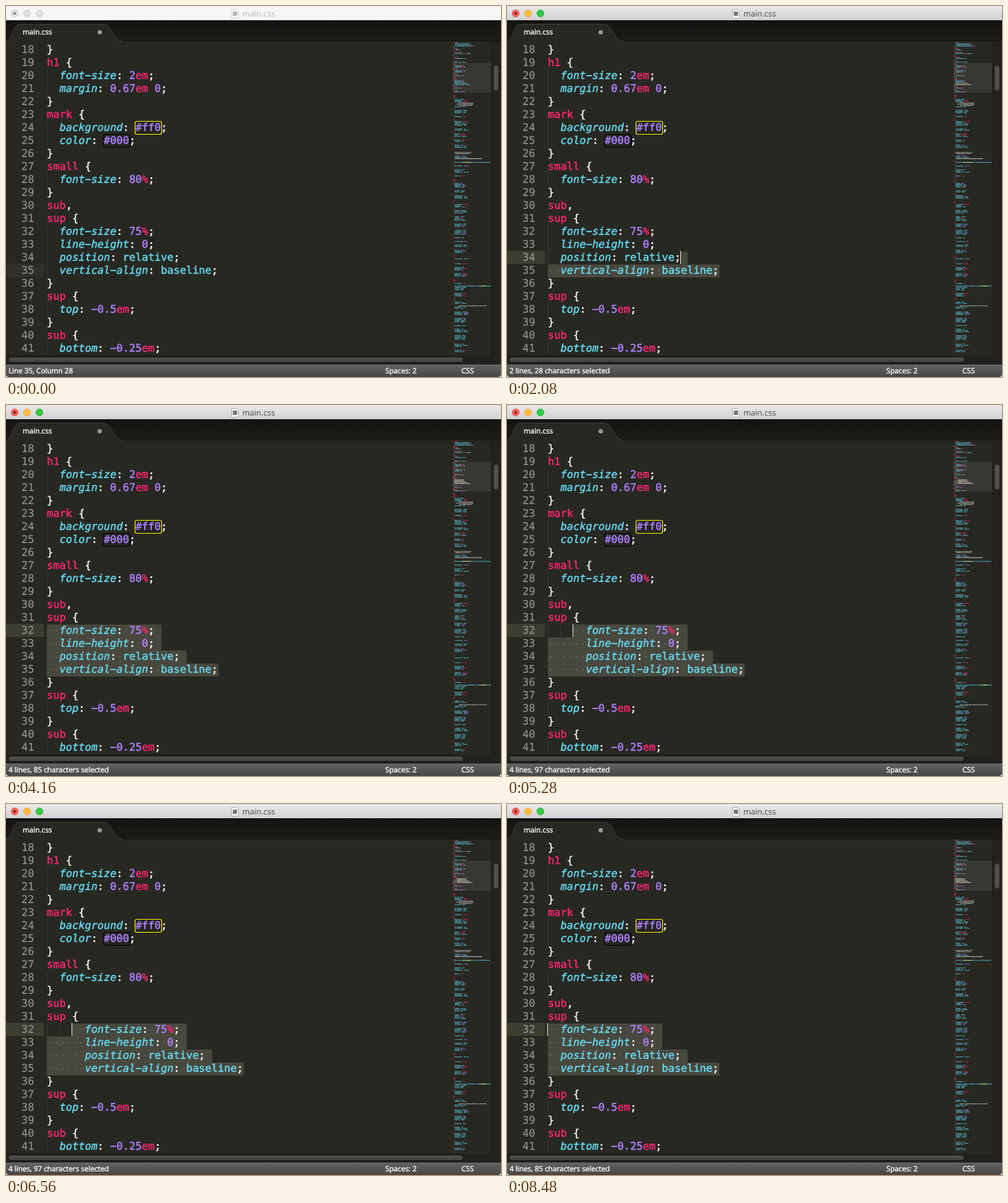
These frames come from a looping animation (800 by 600 pixels, 8.8 s). An HTML page with a canvas:

```html
<!DOCTYPE html>
<html lang="en">
<head>
<meta charset="utf-8">
<title>main.css</title>
<style>
  html, body { margin: 0; width: 100%; height: 100%; overflow: hidden; background: #fff; }
  svg, canvas { position: absolute; left: 0; top: 0; display: block; }
  canvas { left: 722px; top: 58px; }
  text { white-space: pre; text-rendering: geometricPrecision; }
  .ui { font: 11.7px "Open Sans", "Noto Sans", sans-serif; fill: #fff; stroke: #fff; stroke-width: .4; }
  .title { font: 13px "Open Sans", "Noto Sans", sans-serif; fill: #484848; }
  .code { font: 17px "DejaVu Sans Mono", monospace; stroke-width: .5; }
  .line { fill: #8f908a; stroke: #8f908a; stroke-width: .25; text-anchor: end; }
  .prop { font-style: italic; }
  .idle .title { fill: #b6b6b6; }
  .idle .icon { opacity: .5; }
  .idle .bar { fill: #f6f6f6; }
  .idle .light { fill: #dedede; stroke: #c8c8c8; }
  .idle .dirty { fill: #808080; }
</style>
</head>
<body>
<svg id="stage" width="800" height="600" viewBox="0 0 800 600">
  <defs>
    <linearGradient id="chrome" x2="0" y2="1"><stop stop-color="#ebe9eb"/><stop offset="1" stop-color="#d2d0d2"/></linearGradient>
    <linearGradient id="tabs" x2="0" y2="1"><stop stop-color="#131411"/><stop offset="1" stop-color="#1b1c18"/></linearGradient>
    <linearGradient id="status" x2="0" y2="1"><stop stop-color="#626262"/><stop offset="1" stop-color="#464646"/></linearGradient>
    <linearGradient id="thumb" x2="0" y2="1"><stop stop-color="#555651"/><stop offset="1" stop-color="#3e3f3a"/></linearGradient>
  </defs>
  <path fill="#272822" d="M0 0H800V580H0Z"/>
  <rect class="bar" width="800" height="23" fill="url(#chrome)"/>
  <g stroke-width=".8">
    <circle class="light" cx="14" cy="12" r="5.7" fill="#fc605b" stroke="#df4744"/>
    <circle class="light" cx="34" cy="12" r="5.7" fill="#fdbc40" stroke="#de9f34"/>
    <circle class="light" cx="54" cy="12" r="5.7" fill="#34c84a" stroke="#27aa35"/>
  </g>
  <circle class="dirty" cx="14" cy="12" r="2" fill="#730b08"/>
  <g class="icon">
    <path d="M364.5 5.500H372.500L375.500 8.500V19.500H364.500Z" fill="#fff" stroke="#a8a8a8"/>
    <rect x="366.500" y="9" width="7" height="7" fill="#777"/>
  </g>
  <text class="title" x="382" y="17">main.css</text>

  <rect y="23" width="800" height="34" fill="url(#tabs)"/>
  <path d="M0 57.500C12 55 9 29.500 22 29.500H157C173 29.500 170 54 188 57.500" fill="#272822" stroke="#41423c"/>
  <path d="M188 56.500H800" stroke="#11120f"/>
  <text class="ui" x="27" y="46">main.css</text>
  <circle cx="151.500" cy="42.500" r="3.600" fill="#989994"/>

  <g id="code" class="code"></g>

  <path d="M785 57H800V580H785Z" fill="#21221e"/>
  <path d="M784.500 57V566" stroke="#191a17"/>
  <rect x="788.500" y="96.500" width="7" height="40" rx="3.500" fill="#50514c" stroke="#3f403b"/>
  <path d="M0 565H785V580H0Z" fill="#21221e"/>
  <path d="M0 565.500H785" stroke="#191a17"/>
  <rect x="4" y="568" width="735" height="8.500" rx="4.200" fill="url(#thumb)" stroke="#141511"/>
  <path d="M0 580H800V595Q800 600 795 600H5Q0 600 0 595Z" fill="url(#status)"/>
  <path d="M0 580.500H800" stroke="#747474"/>
  <text id="info" class="ui" x="4" y="594"></text>
  <text class="ui" x="613" y="594">Spaces: 2</text>
  <text class="ui" x="736" y="594">CSS</text>
</svg>
<canvas id="map" width="62" height="508"></canvas>
<svg width="800" height="600"><path id="pointer" d="M354.500 432.500V447L357.800 444L360.300 449.800L363 448.600L360.500 443H365Z" fill="#111" stroke="#fff"/></svg>

<script>
const LOOP = 8800, FIRST = 18, LEFT = 66, ADVANCE = 10.234, PITCH = 21, INDENTED = 32, LAST = 35;
const FOCUS = 320, POINTER_END = 1120, CARET_RESET = 960;
const source = `html {
  font-family: sans-serif;
  -ms-text-size-adjust: 100%;
  -webkit-text-size-adjust: 100%;
}
body {
  margin: 0;
}
abbr[title] {
  border-bottom: 1px dotted;
}
b,
strong {
  font-weight: bold;
}
dfn {
  font-style: italic;
}
h1 {
  font-size: 2em;
  margin: 0.67em 0;
}
mark {
  background: #ff0;
  color: #000;
}
small {
  font-size: 80%;
}
sub,
sup {
  font-size: 75%;
  line-height: 0;
  position: relative;
  vertical-align: baseline;
}
sup {
  top: -0.5em;
}
sub {
  bottom: -0.25em;`.split('\n');

// time, caret line, caret column, extra indent levels
const steps = [
  [0, 35, 27, 0], [2080, 34, 21, 0], [2400, 33, 17, 0], [2720, 32, 17, 0],
  [3040, 32, 2, 0], [3200, 32, 0, 0], [4960, 32, 2, 1], [5280, 32, 4, 2],
  [5440, 32, 6, 3], [6560, 32, 4, 2], [6880, 32, 2, 1], [7040, 32, 0, 0]
];
// time since the last key press, caret opacity
const blink = [[0, 1], [640, .75], [800, .35], [960, 0], [1280, .5], [1440, 1]];

const colours = { sel: '#f92672', prop: '#66d9ef', word: '#66d9ef', num: '#ae81ff', unit: '#f92672', punct: '#f8f8f2' };
const byId = id => document.getElementById(id);
const lastAt = (table, t) => table.filter(row => row[0] <= t).pop();
const colX = col => LEFT + col * ADVANCE;
const lineY = n => 60 + (n - FIRST) * PITCH;
const rect = (x, y, w, h, fill, more = '') => `<rect x="${x}" y="${y}" width="${w}" height="${h}" fill="${fill}" ${more}/>`;

function tokenize(text) {
  const declaration = text[0] === ' ';
  return [...text.matchAll(/[a-z-]*[a-z][a-z\d-]*|#\w+|-?\d[\d.]*|[^\s\w]/g)].map(({ 0: word, index: col }) => {
    let kind = 'punct';
    if (/^(em|px|%)$/.test(word)) kind = 'unit';
    else if (/^#|\d$/.test(word) && declaration) kind = 'num';
    else if (/[a-z]/.test(word)) kind = !declaration ? 'sel' : text[col + word.length] === ':' ? 'prop' : 'word';
    return { word, col, kind };
  });
}

function linesFor(indent) {
  return source.map((text, i) => {
    const n = i + 1;
    return { n, text: (n >= INDENTED && n <= LAST ? '  '.repeat(indent) : '') + text };
  });
}

// selected columns of a line, or null
function selection(line, row, col) {
  if (row === LAST || line.n < row || line.n > LAST) return null;
  return { from: line.n === row ? col : 0, to: line.text.length + (line.n < LAST ? 1 : 0) };
}

function drawLine(line, row, col, focused) {
  const { n, text } = line, y = lineY(n), base = y + 16;
  const picked = selection(line, row, col);
  let out = '';
  if (n === row) out += rect(0, y, 61, PITCH, focused ? '#3e3d32' : '#2f302a');
  out += `<text class="line" x="45.500" y="${base}">${n}</text>`;
  for (let c = 0; c < text.search(/\S/); c += 2)
    if (!picked || c < picked.from) out += rect(Math.round(colX(c)), y, 1, PITCH, '#3a3b35');
  if (picked) {
    const x = colX(picked.from);
    out += rect(x, y + 1, colX(picked.to) - x + 1, PITCH, '#49483e', 'rx="2"');
    for (let c = picked.from; c < text.length; c++)
      if (text[c] === ' ') out += `<circle cx="${colX(c + .5)}" cy="${y + 11}" r="1" fill="#77766a"/>`;
  }
  for (const { word, col: c, kind } of tokenize(text)) {
    if (word[0] === '#')
      out += rect(Math.floor(colX(c)) - .5, y + .5, 43, PITCH, '#23241f',
        `rx="3" stroke="${word === '#ff0' ? '#ffff00' : '#000'}" stroke-width="1.200"`);
    // the long dash of the editor font
    const glyphs = word.replace(/-/g, '\u2212');
    out += `<text class="${kind}" x="${colX(c)}" y="${base}" fill="${colours[kind]}" stroke="${colours[kind]}">${glyphs}</text>`;
  }
  return out;
}

function makeRandom(seed) {
  return () => (seed = seed * 16807 % 2147483647) / 2147483647;
}

// a stylesheet-like outline: line number -> runs of [column, length, colour]
function outline() {
  const random = makeRandom(4711), pick = (a, b) => a + Math.floor(random() * (b - a + 1));
  const rows = {};
  for (let n = source.length + 2; n < 254;) {
    for (let k = random() < .2 ? pick(1, 3) : 0; k--;) rows[n++] = [[0, pick(1, 3), colours.sel]];
    rows[n++] = [[0, pick(1, 2), colours.sel]];
    for (let k = pick(1, 4); k--;) {
      const size = pick(7, 13), shade = ['word', 'word', 'num', 'unit'][pick(0, 3)];
      rows[n++] = [[2, size, colours.prop], [size + 4, pick(3, 8), colours[shade]]];
    }
    n++;
  }
  const wide = [[50, 8, 24, '#ccc'], [51, 4, 28, '#ccc'], [52, 9, 22, '#ccc'], [90, 1, 28, '#ccc'], [91, 3, 24, '#ccc'],
    [95, 2, 44, '#fff'], [98, 2, 58, colours.prop], [198, 2, 60, colours.prop], [214, 8, 46, '#ccc']];
  for (const [n, ...run] of wide) rows[n] = [run];
  rows[98].push([15, 14, '#e6db74']);
  rows[198].push([42, 12, '#e6db74']);
  return rows;
}

const filler = outline();
const map = byId('map').getContext('2d');

function drawMap(lines, row, col) {
  const random = makeRandom(99);
  map.globalAlpha = 1;
  map.fillStyle = '#272822';
  map.fillRect(0, 0, 62, 508);
  map.fillStyle = '#373832';
  map.fillRect(0, 34, 62, 48);
  for (let n = 1; n < 254; n++) {
    const line = lines[n - 1], y = (n - 1) * 2;
    const picked = line && selection(line, row, col);
    const runs = line ? tokenize(line.text).map(t => [t.col, t.word.length, colours[t.kind]]) : filler[n] || [];
    if (picked) {
      map.globalAlpha = 1;
      map.fillStyle = '#5a5a51';
      map.fillRect(picked.from + 1, y, picked.to - picked.from, 2);
    }
    for (const [start, size, colour] of runs) {
      map.fillStyle = picked ? '#c8c8be' : colour;
      for (let c = 0; c < size; c++) {
        map.globalAlpha = .3 + random() * .35;
        map.fillRect(start + c + 1, y, 1, 1);
        map.globalAlpha *= .6;
        map.fillRect(start + c + 1, y + 1, 1, 1);
      }
    }
  }
}

function statusText(lines, row, col) {
  const sizes = lines.map(line => selection(line, row, col)).filter(Boolean).map(s => s.to - s.from);
  if (!sizes.length) return `Line ${row}, Column ${col + 1}`;
  return `${sizes.length} lines, ${sizes.reduce((a, b) => a + b)} characters selected`;
}

function render(t) {
  const [time, row, col, indent] = lastAt(steps, t);
  const focused = t >= FOCUS, lines = linesFor(indent);
  const alpha = focused ? lastAt(blink, Math.max(0, t - (time || CARET_RESET)))[1] : 0;
  let out = lines.slice(FIRST - 1).map(line => drawLine(line, row, col, focused)).join('');
  if (focused && row === LAST)
    out += rect(colX(4), lineY(32) - 1, 10, 1, '#d8d8d2') + rect(LEFT, lineY(37) - 1, 10, 1, '#d8d8d2');
  out += rect(Math.round(colX(col) - 1), lineY(row), 1, PITCH, '#f8f8f0', `opacity="${alpha}"`);
  byId('code').innerHTML = out;
  byId('info').textContent = statusText(lines, row, col);
  byId('stage').classList.toggle('idle', !focused);
  byId('pointer').style.display = focused && t < POINTER_END ? '' : 'none';
  drawMap(lines, row, col);
}

const begin = performance.now();
let shown = -1;
function tick() {
  const t = Math.floor((performance.now() - begin) % LOOP / 160) * 160;
  if (t !== shown) render(shown = t);
  requestAnimationFrame(tick);
}
tick();
</script>
</body>
</html>
```
